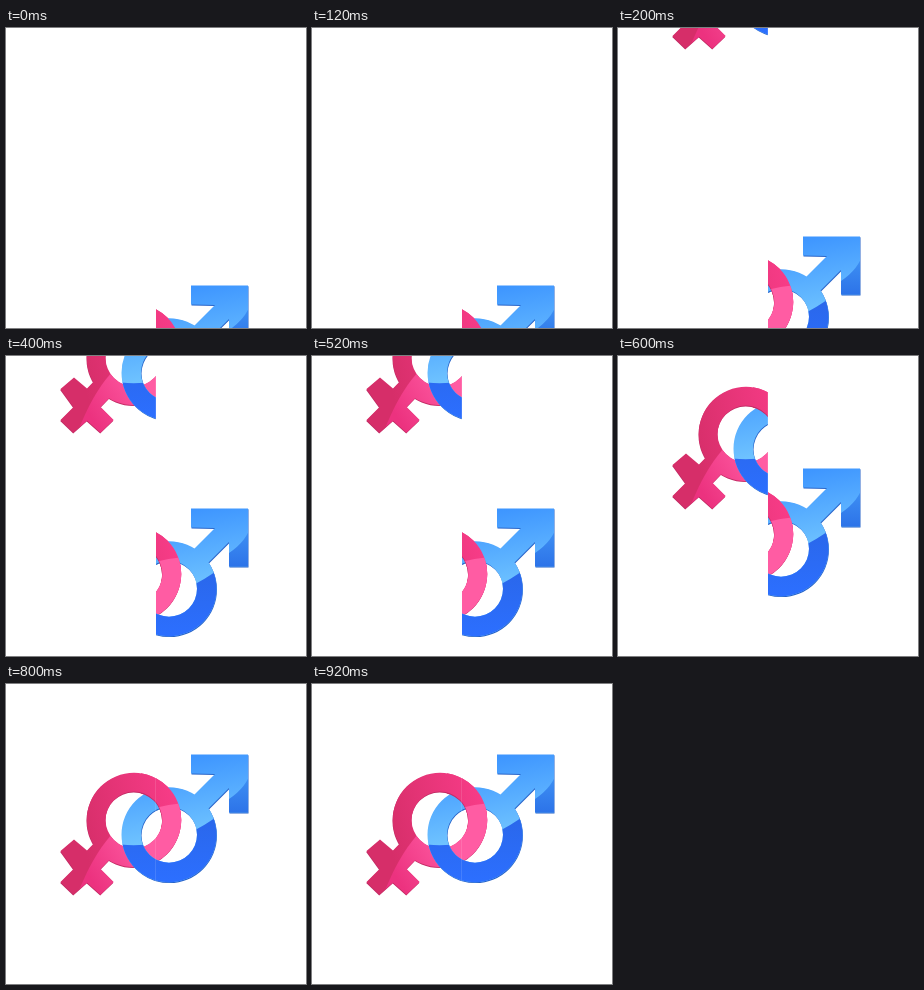
Animation, 300 px wide and 300 px high, one loop 1 s. Source, as an HTML page with a canvas:

```html
<!DOCTYPE html>
<html>
<head>
<meta charset="utf-8">
<style>
html, body { margin: 0; width: 100%; height: 100%; overflow: hidden; background: #fff; }
canvas { display: block; width: 300px; height: 300px; }
</style>
</head>
<body>
<canvas id="stage"></canvas>
<script>
const canvas = document.getElementById('stage');
const ratio = window.devicePixelRatio || 1;
canvas.width = canvas.height = 300 * ratio;
const ctx = canvas.getContext('2d');
ctx.scale(ratio, ratio);

const STEP = 200;
const leftY = [-250, -190, -134, -58, 0];
const rightY = [187, 138, 82, 42, 0];

// Ring and its attached polygon as one filled path
function symbol(x, y, outer, inner, points) {
  const path = new Path2D();
  path.moveTo(x + outer, y);
  path.arc(x, y, outer, 0, 2 * Math.PI);
  path.closePath();
  path.moveTo(x + inner, y);
  path.arc(x, y, inner, 0, 2 * Math.PI, true);
  path.closePath();
  path.addPath(new Path2D('M' + points + 'Z'));
  return path;
}

function gradient(x0, y0, x1, y1, from, to) {
  const g = ctx.createLinearGradient(x0, y0, x1, y1);
  g.addColorStop(0, from);
  g.addColorStop(1, to);
  return g;
}

const female = {
  path: symbol(128, 136, 47.2, 28.4, '54.5 167L68 155.5 81 166.5 93 154 109 170 94.5 185 107.5 198 94.5 210.5 81 198.5 67.5 210.5 54.5 198 67.5 185'),
  edge: '#c22a64',
  dx: -0.3,
  base: gradient(75, 150, 175, 125, '#d62e69', '#f83c88'),
  shades: [
    [new Path2D('M70 214C82 183 98 151 126 133Q148 121 180 119V220H70Z'), gradient(85, 195, 140, 160, '#ec327f', '#ff5ca3')]
  ]
};

const male = {
  path: symbol(163, 150.7, 47.5, 28, '185 70.4L242 70.4 242 128.5 223 128.5 223 104 196.5 130.5 182.5 116.5 209 90 185 89.6'),
  edge: '#2763c8',
  dx: 0.5,
  base: gradient(185, 70, 200, 150, '#3c94ff', '#70c4ff'),
  shades: [
    [new Path2D('M110 160Q165 167 213 131V202H110Z'), gradient(0, 132, 0, 198, '#2a67ea', '#2c6fff')],
    [new Path2D('M244 90Q238 108 213 121V132H244Z'), gradient(0, 90, 0, 130, '#3f92f4', '#2c72e8')]
  ]
};

function drawSymbol(s) {
  ctx.save();
  ctx.translate(s.dx, 0.9);
  ctx.fillStyle = s.edge;
  ctx.fill(s.path);
  ctx.restore();
  ctx.fillStyle = s.base;
  ctx.fill(s.path);
  ctx.save();
  ctx.clip(s.path);
  for (const [area, paint] of s.shades) {
    ctx.fillStyle = paint;
    ctx.fill(area);
  }
  ctx.restore();
}

function clipRect(x, y, w, h) {
  ctx.beginPath();
  ctx.rect(x, y, w, h);
  ctx.clip();
}

function drawHalf(x, dy) {
  ctx.save();
  clipRect(x, 0, 150, 300);
  ctx.translate(0, dy);
  drawSymbol(female);
  drawSymbol(male);
  // The pink ring passes over the blue one at the upper crossing
  clipRect(135, 80, 50, 63);
  drawSymbol(female);
  ctx.restore();
}

function frame(now) {
  const i = Math.floor(now / STEP) % 5;
  ctx.fillStyle = '#fff';
  ctx.fillRect(0, 0, 300, 300);
  drawHalf(0, leftY[i]);
  drawHalf(150, rightY[i]);
  // Faint seam between the halves
  ctx.fillStyle = 'rgba(255,255,255,.12)';
  ctx.fillRect(149, 0, 1, 300);
  requestAnimationFrame(t => frame(Math.max(0, t - start)));
}

const start = performance.now();
frame(0);
</script>
</body>
</html>
```
